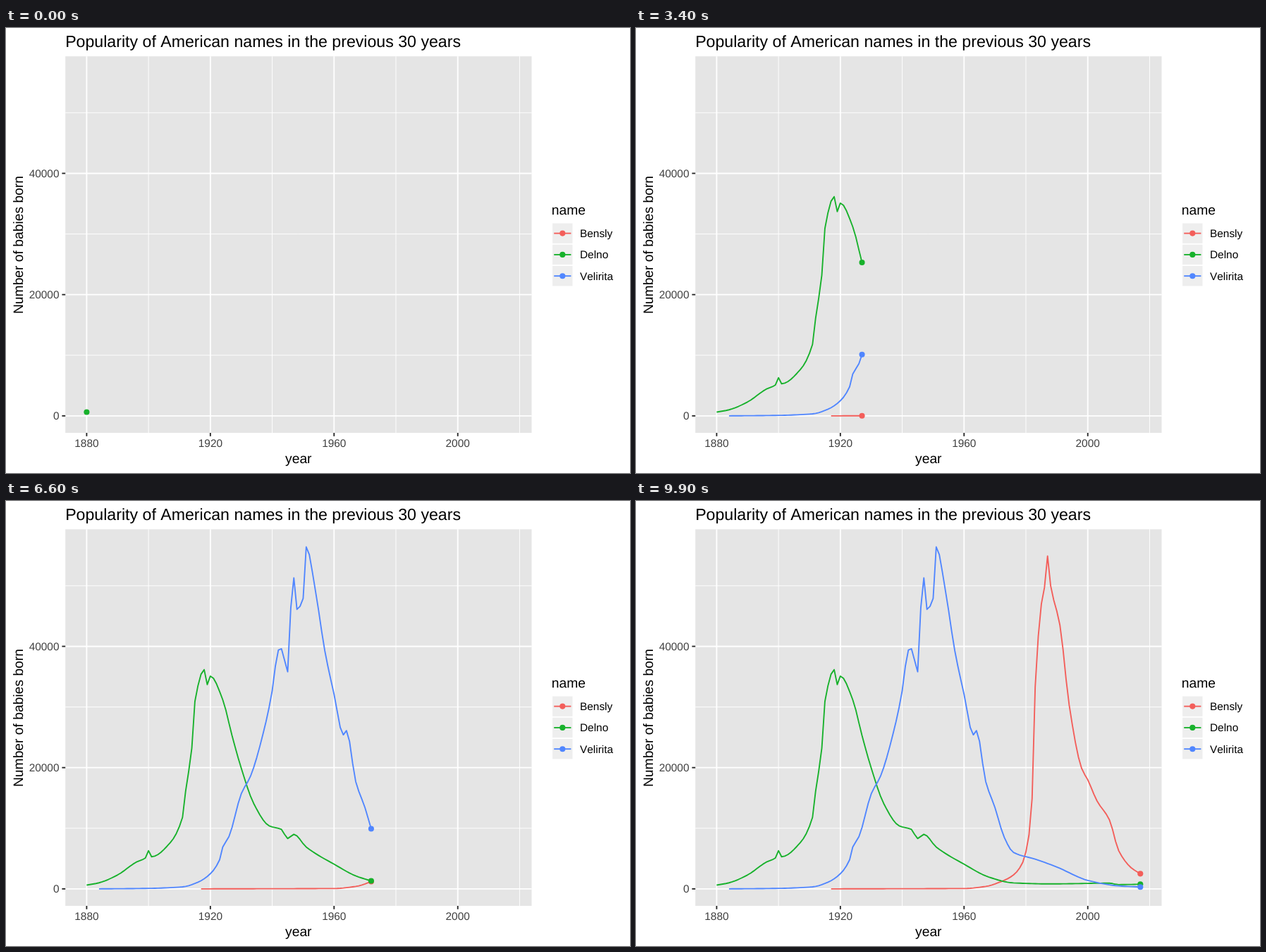
Recreate the animation shown at these times as an HTML page with a canvas. Size 885 by 632 pixels, loop 10 s.

```html
<!DOCTYPE html>
<html lang="en">
<head>
<meta charset="utf-8">
<title>Popularity of American names</title>
<style>
html, body { margin: 0; width: 885px; height: 632px; overflow: hidden; background: #fff; }
canvas, svg { position: absolute; left: 0; top: 0; display: block; }
text {
  font-family: "Liberation Sans", Arial, Helvetica, sans-serif;
  font-size: 15.4px;
  font-kerning: none;
  text-rendering: geometricPrecision;
  fill: #000;
}
.title { font-size: 23.15px; }
.label { font-size: 19.3px; }
.tick text { fill: #404040; }
.mid { text-anchor: middle; }
.end { text-anchor: end; }
</style>
</head>
<body>
<canvas id="stage" width="885" height="632"></canvas>
<svg width="885" height="632" viewBox="0 0 885 632">
  <text class="title" x="84.2" y="26.9">Popularity of American names in the previous 30 years</text>
  <text class="label mid" x="414.8" y="618.2">year</text>
  <text class="label mid" transform="translate(23.6 308) rotate(-90)">Number of babies born</text>
  <g class="tick mid">
    <text x="114.4" y="595.3">1880</text>
    <text x="289.9" y="595.3">1920</text>
    <text x="465.3" y="595.3">1960</text>
    <text x="640.7" y="595.3">2000</text>
  </g>
  <g class="tick end">
    <text x="75.5" y="556.3">0</text>
    <text x="75.5" y="384.1">20000</text>
    <text x="75.5" y="211.9">40000</text>
  </g>
  <text class="label" x="773.8" y="264.6">name</text>
  <text x="814" y="297.1">Bensly</text>
  <text x="814" y="327.4">Delno</text>
  <text x="814" y="357.7">Velirita</text>
</svg>
<script>
const ctx = document.getElementById("stage").getContext("2d");
const FIRST = 1880, LAST = 2017, STEPS = 100, STEP_MS = 100;
const PANEL = { x: 84.2, y: 40.2, w: 661.3, h: 534.8 };
const LINE = 1.87, DOT = 4.05;

// Counts are in thousands.
const px = year => 114.4 + (year - FIRST) * 4.386;
const py = count => 550.85 - count * 8.61;
const stepOf = year => Math.round((year - FIRST) / (LAST - FIRST) * (STEPS - 1));

// Monotone cubic curve through [year, count] keys, sampled once a year.
function curve(keys) {
  const slope = keys.slice(1).map(([x, y], i) => (y - keys[i][1]) / (x - keys[i][0]));
  const tangent = keys.map((_, i) => {
    const a = slope[i - 1] ?? slope[i], b = slope[i] ?? a;
    return a * b > 0 ? 2 * a * b / (a + b) : 0;
  });
  const points = [];
  for (let i = 0; i < slope.length; i++) {
    const [x0, y0] = keys[i], [x1, y1] = keys[i + 1], w = x1 - x0;
    for (let year = x0; year < x1; year++) {
      const t = (year - x0) / w, u = 1 - t;
      const count = y0 + (y1 - y0) * t * t * (3 - 2 * t)
        + w * t * u * (u * tangent[i] - t * tangent[i + 1]);
      points.push([year, count]);
    }
  }
  return [...points, keys[keys.length - 1]];
}

const series = [
  { color: "#f35e5a", points: curve([
    [1917, 0], [1960, .06], [1967, .4], [1972, 1.2], [1976, 2.3], [1979, 4.4],
    [1981, 8.9], [1982, 14.9], [1983, 33.3], [1985, 47], [1986, 49.7], [1987, 54.9],
    [1988, 50], [1991, 43.5], [1994, 30.3], [1998, 19.9], [2000, 18], [2003, 14.5],
    [2007, 11.4], [2010, 6.3], [2014, 3.5], [2017, 2.5]]) },
  { color: "#17b12b", points: curve([
    [1880, .62], [1884, 1], [1890, 2.3], [1896, 4.4], [1899, 5.1], [1900, 6.3],
    [1901, 5.3], [1907, 7.6], [1911, 11.8], [1912, 16.1], [1914, 23.2], [1915, 30.9],
    [1918, 36.15], [1919, 33.7], [1920, 35.1], [1924, 31.2], [1927, 25.3], [1930, 19.9],
    [1934, 14.1], [1939, 10.4], [1943, 9.8], [1945, 8.3], [1947, 9], [1951, 6.9],
    [1960, 4.07], [1968, 1.95], [1976, .98], [1988, .82], [2007, .94], [2010, .7], [2017, .76]]) },
  { color: "#5086ff", points: curve([
    [1884, 0], [1900, .08], [1911, .33], [1916, 1.1], [1920, 2.5], [1923, 4.8],
    [1924, 6.9], [1926, 8.6], [1930, 15.7], [1933, 18.6], [1938, 27.6], [1940, 32.7],
    [1942, 39.4], [1943, 39.6], [1945, 35.8], [1946, 46.3], [1947, 51.3], [1948, 46.1],
    [1950, 47.9], [1951, 56.4], [1954, 49.1], [1957, 39.3], [1960, 32.1], [1963, 25.4],
    [1964, 26.1], [1967, 17.7], [1970, 13.4], [1973, 8.5], [1976, 6], [1983, 4.9],
    [1990, 3.6], [2000, 1.4], [2010, .49], [2017, .31]]) }
];

function stroke(points, color, width) {
  ctx.beginPath();
  points.forEach(([x, y]) => ctx.lineTo(x, y));
  ctx.strokeStyle = color;
  ctx.lineWidth = width;
  ctx.stroke();
}

function dot(x, y, color) {
  ctx.beginPath();
  ctx.arc(x, y, DOT, 0, Math.PI * 2);
  ctx.fillStyle = color;
  ctx.fill();
}

function drawGrid() {
  const { x, y, w, h } = PANEL;
  const column = (year, width) => stroke([[px(year), y], [px(year), y + h]], "#fff", width);
  const row = (count, width) => stroke([[x, py(count)], [x + w, py(count)]], "#fff", width);
  ctx.fillStyle = "#e5e5e5";
  ctx.fillRect(x, y, w, h);
  [1900, 1940, 1980, 2020].forEach(v => column(v, LINE / 2));
  [10, 30, 50].forEach(v => row(v, LINE / 2));
  for (const v of [1880, 1920, 1960, 2000]) {
    column(v, LINE);
    stroke([[px(v), y + h], [px(v), y + h + 4.8]], "#272727", LINE);
  }
  for (const v of [0, 20, 40]) {
    row(v, LINE);
    stroke([[x - 4.8, py(v)], [x, py(v)]], "#272727", LINE);
  }
}

function drawLegend() {
  series.forEach(({ color }, i) => {
    const y = 291.6 + i * 30.3;
    ctx.fillStyle = "#eee";
    ctx.fillRect(775.1, y - 14.2, 28.4, 28.4);
    stroke([[777.2, y], [801.4, y]], color, LINE);
    dot(789.3, y, color);
  });
}

function draw(step) {
  ctx.fillStyle = "#fff";
  ctx.fillRect(0, 0, 885, 632);
  ctx.lineJoin = "round";
  drawGrid();
  drawLegend();
  const paths = series.map(({ points }) => points
    .filter(([year]) => stepOf(year) <= step)
    .map(([year, count]) => [px(year), py(count)]));
  paths.forEach((path, i) => stroke(path, series[i].color, LINE));
  paths.forEach((path, i) => {
    if (path.length) dot(...path[path.length - 1], series[i].color);
  });
}

function tick(now) {
  draw(Math.floor(now / STEP_MS) % STEPS);
  requestAnimationFrame(tick);
}
draw(0);
requestAnimationFrame(tick);
</script>
</body>
</html>
```
